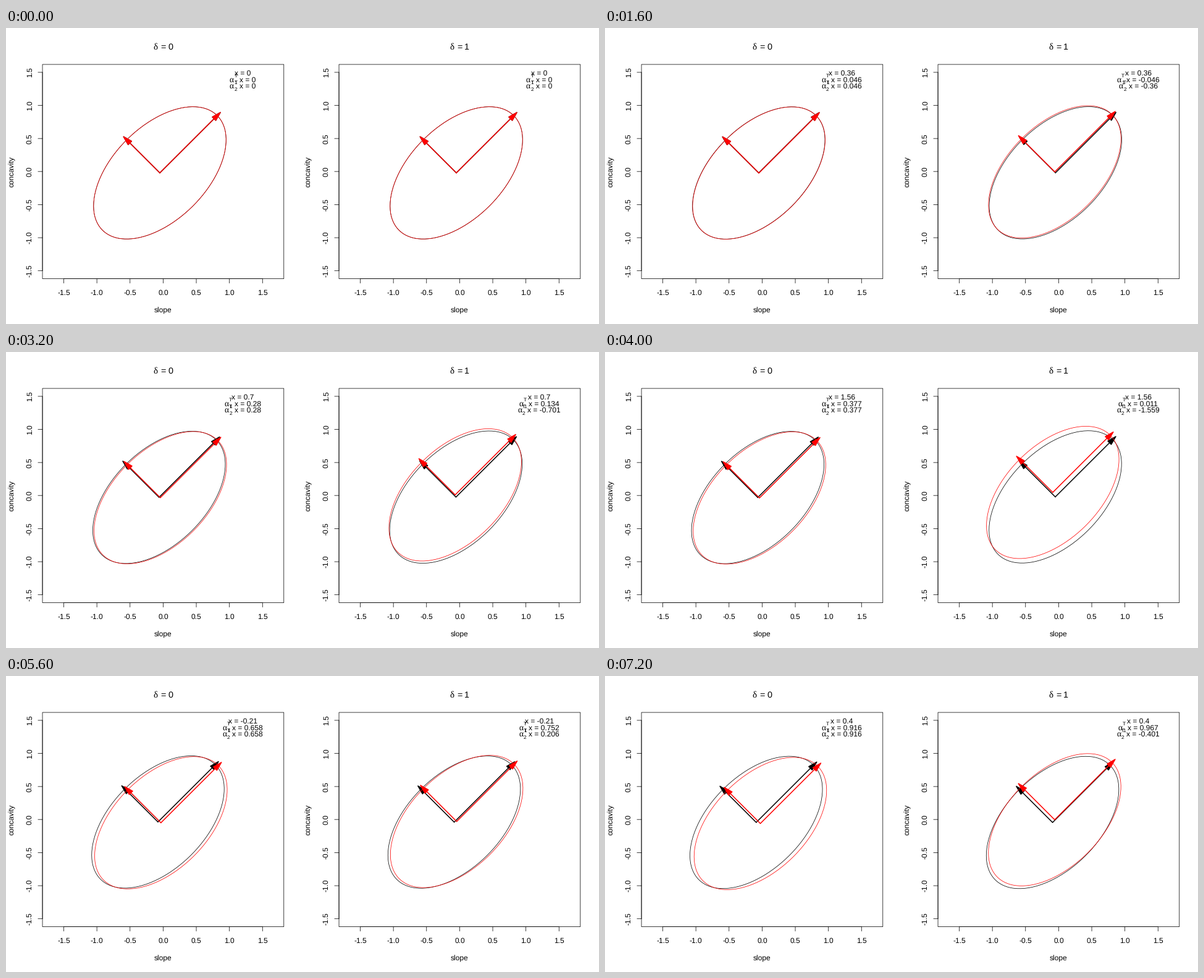
A matplotlib script that plays this animation: 960x480 px, repeating every 8 s.

```python
import numpy as np
import matplotlib as mpl
import matplotlib.pyplot as plt
from matplotlib.animation import FuncAnimation
from matplotlib.patches import Polygon, Rectangle

mpl.rcParams["text.hinting"] = "none"

W, H = 960, 480
SCALE = 107.26                     # pixels per data unit
CX, CY = 254.4, 232.8              # pixel position of the data origin
PANEL = 480                        # distance between the two panels
LEFT, RIGHT, TOP, BOTTOM = 59.04, 449.76, 59.04, 406.56
THIN, THICK = 0.75, 1.5
SANS, GREEK = "Liberation Sans", "Liberation Serif"
TICKS = np.arange(-1.5, 1.6, 0.5)

# Each step: x, score in the left panel, both scores in the right panel
STEPS = [
    (0, 0, 0, 0),
    (0.2, 0.021, -0.024, -0.198),
    (0.36, 0.046, -0.046, -0.36),
    (-0.58, 0.163, 0.364, 0.578),
    (0.7, 0.28, 0.134, -0.701),
    (1.56, 0.377, 0.011, -1.559),
    (-0.45, 0.571, 0.796, 0.446),
    (-0.21, 0.658, 0.752, 0.206),
    (0.5, 0.744, 0.737, -0.498),
    (0.4, 0.916, 0.967, -0.401),
]

BASE = np.array([-0.05, -0.02])
TILT = np.pi / 6
DRIFT_1 = -0.05 * np.array([np.cos(TILT), np.sin(TILT)])
DRIFT_2 = 0.05 * np.array([np.sin(TILT), -np.cos(TILT)])

# Arrow head pointing along +x, centred on the origin
HEAD = np.array([[-7.2, 3.9], [7.2, 0], [-7.2, -3.9]])

fig = plt.figure(figsize=(W / 72, H / 72), dpi=72, facecolor="white")
ax = fig.add_axes([0, 0, 1, 1])
ax.set_xlim(0, W)
ax.set_ylim(H, 0)
ax.axis("off")
moving = []


def text(x, y, s, size=12, font=SANS, ha="left", rotation=0):
    return ax.text(x, y, s, fontsize=size, family=font, ha=ha, va="baseline",
                   rotation=rotation, rotation_mode="anchor")


def advance(s, size=12):
    """Natural width of a label in the sans font."""
    em = {" ": 0.278, ".": 0.278, "-": 0.333, "=": 0.584, "x": 0.5}
    return size * sum(em.get(c, 0.556) for c in s)


def line(xs, ys, color="black", lw=THIN, **kw):
    return ax.plot(xs, ys, color=color, lw=lw, snap=False,
                   solid_capstyle="round", **kw)[0]


def to_pixels(points, dx):
    points = np.asarray(points)
    return np.stack([CX + dx + SCALE * points[..., 0],
                     CY - SCALE * points[..., 1]], axis=-1)


def draw_panel(dx, delta):
    ax.add_patch(Rectangle((LEFT + dx, TOP), RIGHT - LEFT, BOTTOM - TOP,
                           fill=False, ec="black", lw=THIN, snap=False))
    xs, ys = CX + dx + TICKS * SCALE, CY - TICKS * SCALE
    line(xs[[0, -1]], [BOTTOM, BOTTOM])
    line([LEFT + dx, LEFT + dx], ys[[0, -1]])
    for v, x, y in zip(TICKS, xs, ys):
        line([x, x], [BOTTOM, BOTTOM + 7.2])
        line([LEFT + dx - 7.2, LEFT + dx], [y, y])
        text(x, 433, f"{v:.1f}", ha="center")
        text(41.8 + dx, y, f"{v:.1f}", ha="center", rotation=90)
    text(CX + dx, 461.7, "slope", ha="center")
    text(13 + dx, CY, "concavity", ha="center", rotation=90)
    left = CX + dx - 15.7
    text(left, 35, "δ", 15, GREEK)
    text(left + 11.1, 35, "=", 14.4)
    text(left + 23.5, 35, delta, 14.4)


def draw_arrow(start, end, color, z):
    d = (end - start) / np.hypot(*(end - start))
    turn = np.array([[d[0], d[1]], [-d[1], d[0]]])
    moving.append(line(*np.c_[start, end], color, THICK, zorder=z))
    moving.append(ax.add_patch(Polygon(end + HEAD @ turn, fc=color, ec=color,
                                       lw=THICK, joinstyle="round",
                                       zorder=z)))


def draw_shape(center, dx, color, z):
    t = np.linspace(0, 2 * np.pi, 200)
    half = np.pi / 6               # correlation 0.5
    ring = center + np.c_[np.cos(t - half), np.cos(t + half)]
    moving.append(line(*to_pixels(ring, dx).T, color, zorder=z))
    start = to_pixels(center, dx)
    for axis in (np.full(2, np.sqrt(0.75)), np.array([-0.5, 0.5])):
        draw_arrow(start, to_pixels(center + axis, dx), color, z + 0.1)


def draw_scores(dx, x, scores):
    mid = CX + dx + 1.2 * SCALE
    label = f"x = {x:g}"
    moving.append(text(mid - advance(label) / 2, 76.7, label))
    for i, score in enumerate(scores):
        label = f"x = {score:g}"
        y = 87.4 + 10.7 * i
        left = mid - (16 + advance(label)) / 2
        moving.extend([
            text(left, y, "α", 13.5, GREEK),
            text(left + 7.6, y - 7.2, "T", 8.4),
            text(left + 7.6, y + 4, str(i + 1), 8.4),
            text(left + 16, y, label),
        ])


def update(i):
    while moving:
        moving.pop().remove()
    x, score, first, second = STEPS[i]
    for dx, scores in ((0, (score, score)), (PANEL, (first, second))):
        draw_shape(BASE + scores[0] * DRIFT_1, dx, "black", 3)
        draw_shape(BASE + scores[1] * DRIFT_2, dx, "red", 4)
        draw_scores(dx, x, scores)
    return moving


draw_panel(0, "0")
draw_panel(PANEL, "1")
anim = FuncAnimation(fig, update, frames=len(STEPS), interval=800,
                     init_func=lambda: update(0), repeat=True, repeat_delay=0)
plt.show()
```
